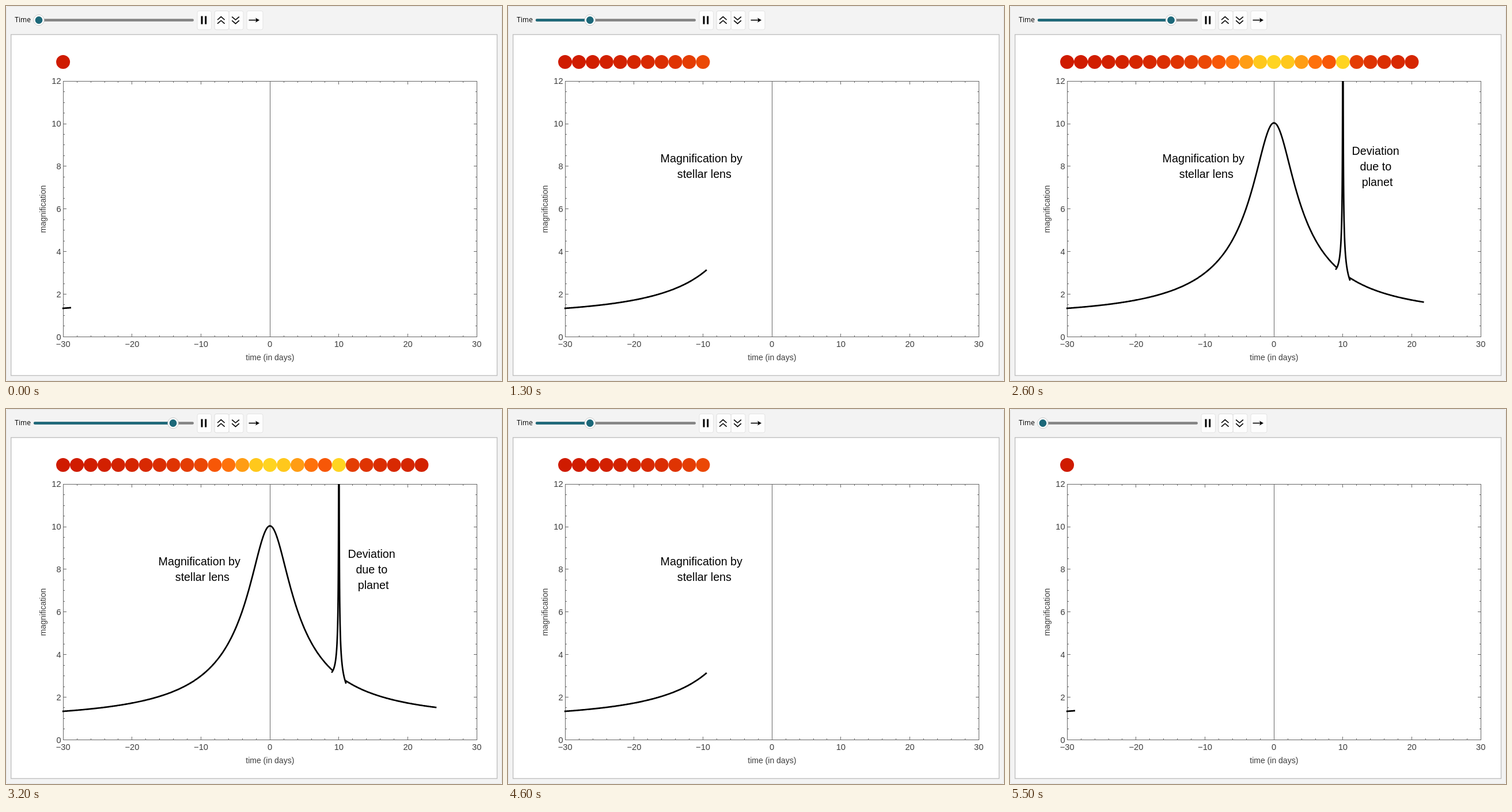
Animation of 861x650 px, one loop 6 s. Source, as an HTML page:

```html
<!DOCTYPE html>
<html lang="en">
<head>
<meta charset="utf-8">
<title>Magnification by a stellar lens</title>
<style>
  html, body { margin: 0; width: 100%; height: 100%; overflow: hidden; background: #fff; }
  svg { display: block; width: 861px; height: 650px; font-family: "Liberation Sans", Arial, sans-serif; }
  .time { font: 12px "Open Sans", "Noto Sans", sans-serif; }
  .button { fill: #fdfdfd; stroke: #e3e3e3; }
  .icon { fill: none; stroke: #000; stroke-width: 1.6; }
  #axes { fill: none; stroke: #666; shape-rendering: crispEdges; }
  #labels { font-size: 14.7px; fill: #3c3c3c; }
  .name { font-size: 14px; }
  .note { font-size: 19.7px; }
  #curve { fill: none; stroke: #000; stroke-width: 2.7; stroke-linecap: square; stroke-linejoin: round; }
</style>
</head>
<body>
<svg viewBox="0 0 861 650">
  <defs><clipPath id="plot"><rect x="90" y="130" width="740" height="445"/></clipPath></defs>
  <rect x=".5" y=".5" width="860" height="649" rx="3" fill="#f3f3f3" stroke="#e4e4e4"/>
  <rect x="8.75" y="49.5" width="843.75" height="591" fill="#fff" stroke="#bfbfbf" stroke-width="1.4"/>

  <text class="time" x="15.3" y="28">Time</text>
  <g stroke-width="4.4" stroke-linecap="round">
    <path d="M50.2 24.5H323.8" stroke="#838383"/>
    <path id="filled" stroke="#1c6879"/>
  </g>
  <g id="knob">
    <circle cy="24.5" r="9.3" fill="#fff" stroke="#c4c4c4" stroke-width=".9"/>
    <circle cy="24.5" r="6.4" fill="#1c6879"/>
  </g>

  <rect class="button" x="332" y="8.5" width="24.5" height="32.5" rx="3"/>
  <rect class="button" x="387" y="8.5" width="25" height="32.5" rx="3"/>
  <rect class="button" x="362" y="8.5" width="25" height="32.5" rx="3" style="stroke:#dcdcdc"/>
  <rect class="button" x="418" y="8.5" width="28" height="32.5" rx="3"/>
  <path d="M338.5 17.5h3v14h-3zM345.2 17.5h3v14h-3z"/>
  <path class="icon" d="M367 24l6.3-5.4 6.3 5.4M367 30.6l6.3-5.4 6.3 5.4"/>
  <path class="icon" d="M392.2 18.6l6.3 5.4 6.3-5.4M392.2 25.2l6.3 5.4 6.3-5.4"/>
  <path class="icon" d="M421.5 24.5H436"/>
  <path d="M440 24.5l-7-4 1.6 4-1.6 4z"/>

  <path id="axes"/>
  <g id="labels">
    <text class="name" x="458.3" y="614" text-anchor="middle">time (in days)</text>
    <text class="name" transform="translate(69 352) rotate(-90)" text-anchor="middle">magnification</text>
  </g>
  <g id="dots"></g>
  <path id="curve" clip-path="url(#plot)"/>
  <g class="note" id="star">
    <text x="264.6" y="271">Magnification by</text>
    <text x="293.8" y="298">stellar lens</text>
  </g>
  <g class="note" id="planet">
    <text x="593.6" y="257.5">Deviation</text>
    <text x="607.4" y="284.5">due to</text>
    <text x="610.8" y="311.5">planet</text>
  </g>
</svg>
<script>
const el = id => document.getElementById(id);
const px = t => 99.2 + (t + 30) * 11.967;
const py = a => 573.4 - a * 36.94;

function add(parent, tag, attrs, text = '') {
  const node = document.createElementNS('http://www.w3.org/2000/svg', tag);
  for (const key in attrs) node.setAttribute(key, attrs[key]);
  node.textContent = text;
  parent.append(node);
  return node;
}

// Point lens: impact parameter 0.1, crossing time 30 days
function lens(t) {
  const q = 0.01 + (t / 30) ** 2;
  return (q + 2) / Math.sqrt(q * (q + 4));
}

function spike(t) {
  const d = Math.max(Math.abs(t - 10), 1e-3);
  return Math.min(13, lens(t) - 0.1 + 1.05 * (d ** -0.7 - 1));
}

function trace(f, from, to, step) {
  if (to <= from) return '';
  const n = Math.ceil((to - from) / step);
  let d = '';
  for (let i = 0; i <= n; i++) {
    const t = from + (to - from) * i / n;
    d += (i ? 'L' : 'M') + px(t).toFixed(2) + ' ' + py(f(t)).toFixed(2);
  }
  return d;
}

const stops = [
  [1.3, 206, 26, 0], [3, 235, 72, 5], [4, 254, 96, 9],
  [6, 255, 156, 20], [8.3, 255, 199, 28], [10, 255, 212, 33]
];
function heat(a) {
  a = Math.min(10, Math.max(1.3, a));
  const i = Math.max(1, stops.findIndex(s => s[0] >= a));
  const [p, q] = [stops[i - 1], stops[i]];
  const k = (a - p[0]) / (q[0] - p[0]);
  return `rgb(${[1, 2, 3].map(c => Math.round(p[c] + (q[c] - p[c]) * k))})`;
}

function drawAxes() {
  let d = 'M99.5 130.5H817.5V573.5H99.5ZM458.5 130V573';
  const snap = v => Math.floor(v) + 0.5;
  for (let t = -30; t <= 30; t += 2) {
    const x = snap(px(t)), major = t % 10 === 0, len = major ? 6 : 3;
    d += `M${x} 130v${len}M${x} 574v${-len}`;
    if (major) add(el('labels'), 'text', { x: px(t), y: 591, 'text-anchor': 'middle' }, String(t).replace('-', '−'));
  }
  for (let a = 0; a <= 12; a += 0.5) {
    const y = snap(py(a)), major = a % 2 === 0, len = major ? 6 : 3;
    d += `M99 ${y}h${len}M818 ${y}h${-len}`;
    if (major) add(el('labels'), 'text', { x: 95.6, y: py(a) + 5.2, 'text-anchor': 'end' }, a);
  }
  el('axes').setAttribute('d', d);
}

const dots = [];
function makeDots() {
  for (let t = -30; t < 30; t += 2) {
    const a = t === 10 ? spike(t) : lens(t);
    dots.push(add(el('dots'), 'circle', { cx: px(t) - 0.1, cy: 97, r: 12, fill: heat(a) }));
  }
}

const show = (node, on) => { node.style.display = on ? '' : 'none'; };

function draw(step) {
  const days = Math.max(1, 2.4 * (step - 0.5));
  const end = days - 29.96;
  const x = 57 + (days - 1) * 4.397;
  el('knob').setAttribute('transform', `translate(${x})`);
  el('filled').setAttribute('d', `M50.2 24.5H${x}`);
  el('curve').setAttribute('d',
    trace(lens, -30, Math.min(end, 9), 0.1) +
    trace(spike, 9, Math.min(end, 11), 0.01) +
    trace(lens, 11, end, 0.1));
  dots.forEach((dot, i) => show(dot, 2 * i < days - 0.1));
  show(el('star'), days > 20);
  show(el('planet'), days > 40);
}

let shown = -1;
function tick() {
  const n = Math.floor(performance.now() % 6000 / 100);
  const step = Math.max(0, Math.min(25, n - 4, 55 - n));
  if (step !== shown) draw(shown = step);
  requestAnimationFrame(tick);
}

drawAxes();
makeDots();
tick();
</script>
</body>
</html>
```
